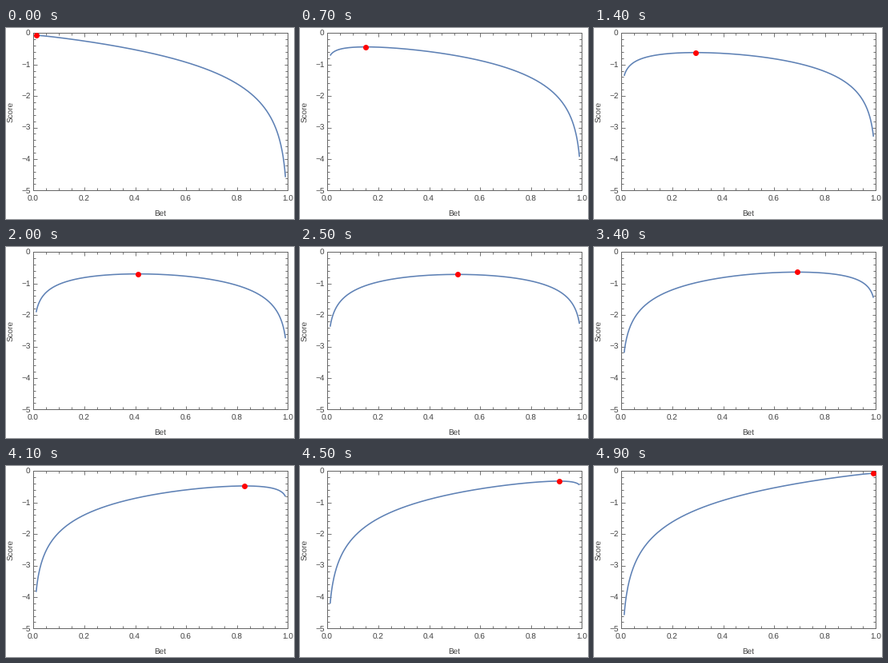
A matplotlib script for the animation above (5000 ms loop, 360x239 px).

```python
import matplotlib.pyplot as plt
import numpy as np
from matplotlib.animation import FuncAnimation
from matplotlib.ticker import MultipleLocator
from matplotlib.transforms import ScaledTranslation

WIDTH, HEIGHT, DPI = 360, 239, 72  # at 72 dpi one point is one pixel
LEFT, RIGHT, TOP, BOTTOM = 34.3, 352.3, 6.3, 203.3
FRAMES, INTERVAL = 50, 100
GRAY = "0.4"
TEXT = "0.25"

plt.rcParams.update({
    "font.family": "Liberation Sans",
    "font.size": 10,
    "text.hinting": "none",
    "text.hinting_factor": 1,
})

fig = plt.figure(figsize=(WIDTH / DPI, HEIGHT / DPI), dpi=DPI, facecolor="white")
ax = fig.add_axes([LEFT / WIDTH, 1 - BOTTOM / HEIGHT,
                   (RIGHT - LEFT) / WIDTH, (BOTTOM - TOP) / HEIGHT])
ax.set(xlim=(0, 1), ylim=(-5, 0))


def label(x, y, text, **style):
    """Place a baseline at pixel coordinates measured from the top left."""
    fig.text(x / WIDTH, 1 - y / HEIGHT, text, color=TEXT, va="baseline", **style)


def style_axis(axis, major, minor):
    axis.set_major_locator(MultipleLocator(major))
    axis.set_minor_locator(MultipleLocator(minor))


style_axis(ax.xaxis, 0.2, 0.05)
style_axis(ax.yaxis, 1, 0.2)
ax.tick_params(which="both", direction="in", top=True, right=True, color=GRAY,
               width=0.9, labelbottom=False, labelleft=False)
ax.tick_params(which="major", length=4.5)
ax.tick_params(which="minor", length=2.8)
for spine in ax.spines.values():
    spine.set(color=GRAY, linewidth=1)

for i in range(6):
    label(LEFT + (RIGHT - LEFT) * i / 5 - 0.6, 216.5, f"{i / 5:.1f}", ha="center")
    label(30.5, TOP + (BOTTOM - TOP) * i / 5 + 3.2, f"\u2212{i}" if i else "0",
          ha="right")
label(193, 235, "Bet", ha="center")
label(9.4, 105, "Score", ha="center", rotation=90, rotation_mode="anchor")


def score(bet, belief):
    return belief * np.log(bet) + (1 - belief) * np.log(1 - bet)


# The frame snaps to whole pixels; the data keeps its subpixel position.
data = ax.transData + ScaledTranslation(0.2 / DPI, -0.7 / DPI, fig.dpi_scale_trans)
bets = np.linspace(0.01, 0.99, 600)
curve, = ax.plot([], [], color=(0.368, 0.507, 0.710), lw=1.6,
                 solid_capstyle="butt", transform=data)
best = ax.scatter([0], [0], s=49, color="red", linewidths=0, clip_on=False,
                  zorder=5, transform=data)
ax.set(xlim=(0, 1), ylim=(-5, 0))


def update(frame):
    belief = 0.01 + 0.02 * frame
    curve.set_data(bets, score(bets, belief))
    best.set_offsets([[belief, score(belief, belief)]])
    return curve, best


animation = FuncAnimation(fig, update, frames=FRAMES, interval=INTERVAL,
                          repeat=True, repeat_delay=0)
plt.show()
```
